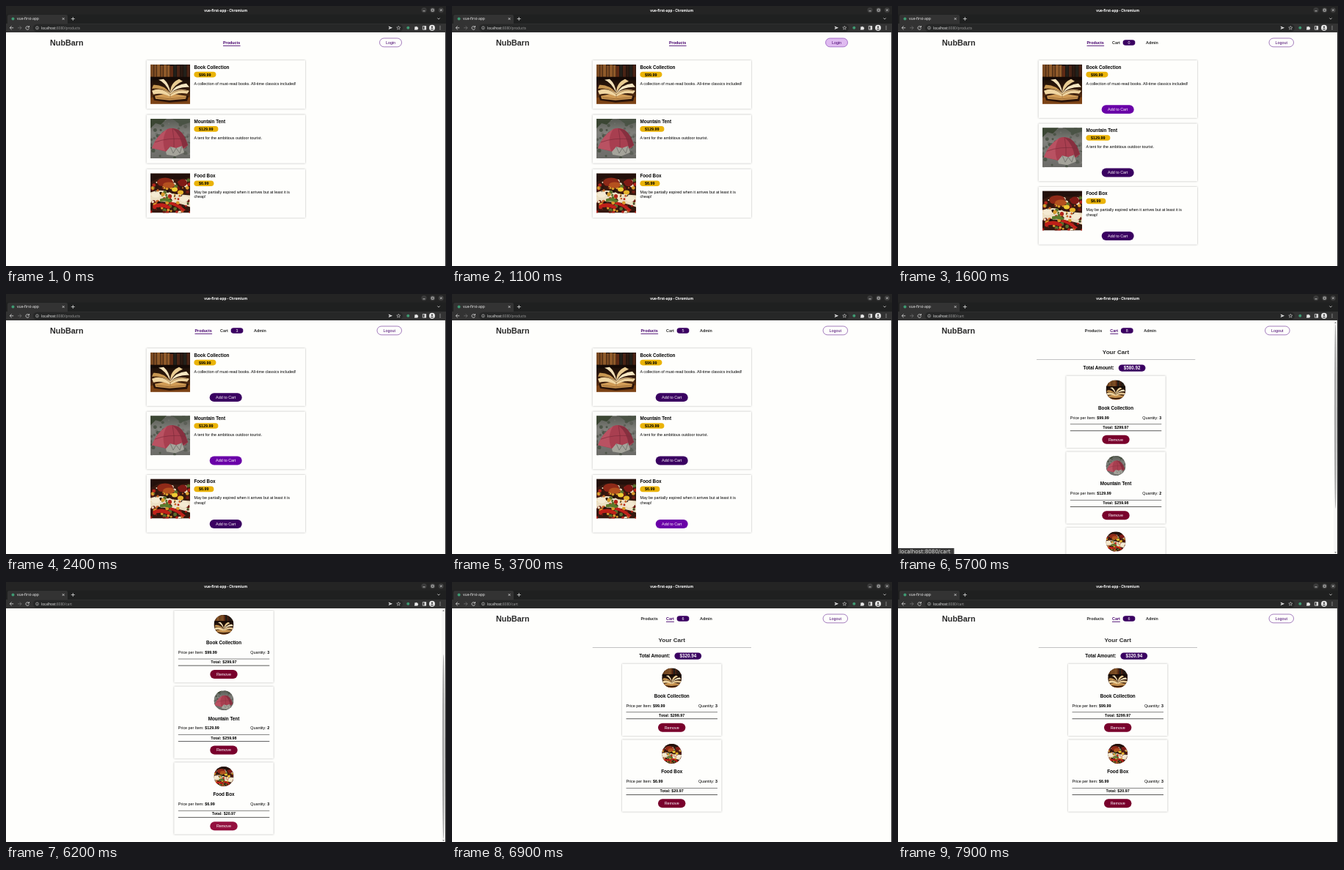
Recreate the animation shown at these times as an HTML page. Size 600x355 px, loop 8 s.

```html
<!DOCTYPE html>
<html lang="en">
<head>
<meta charset="utf-8">
<title>vue-first-app</title>
<style>
html, body { margin: 0; width: 100%; height: 100%; overflow: hidden; background: #fefefc; }
svg { display: block; width: 600px; height: 355px; }
text { font: 5.4px "Liberation Sans", Arial, sans-serif; fill: #000; white-space: pre; }
.b { font-weight: bold; }
.h3 { font-size: 6.32px; font-weight: bold; }
.h2 { font-size: 8.1px; font-weight: bold; fill: #292929; }
.h1 { font-size: 10.8px; font-weight: bold; fill: #292929; }
.mid { text-anchor: middle; }
.end { text-anchor: end; }
.nav { font-weight: bold; fill: #292929; }
.on { fill: #45006d; }
.light { fill: #fff; }
.ui text { font: 4.7px "Noto Sans", "Open Sans", sans-serif; fill: #e8e8e8; }
.ui .title { font-weight: bold; fill: #fff; }
.ui .tab { font-size: 5px; }
.ui .dim { fill: #9a9a9a; }
.card { fill: #fefefc; filter: drop-shadow(0 .7px 1.1px rgba(0, 0, 0, .3)); }
.status { font: 7.2px "DejaVu Sans", sans-serif; fill: #e2e2e2; }
</style>
</head>
<body>
<svg viewBox="0 0 600 355">
  <defs>
    <clipPath id="view"><rect y="36" width="600" height="319"/></clipPath>
    <clipPath id="square"><rect width="54" height="54"/></clipPath>
    <clipPath id="round"><circle cx="27" cy="27" r="27"/></clipPath>
    <linearGradient id="desk" x2="0" y2="1">
      <stop offset=".3" stop-color="#140b07"/><stop offset=".7" stop-color="#3c1f0d"/><stop offset="1" stop-color="#8a4b18"/>
    </linearGradient>
    <linearGradient id="rock" x2="0" y2="1">
      <stop stop-color="#565a52"/><stop offset=".35" stop-color="#80807b"/><stop offset="1" stop-color="#6b6b67"/>
    </linearGradient>
    <g id="books">
      <rect width="54" height="54" fill="url(#desk)"/>
      <g id="shelf"></g>
      <path d="M0 17H54V21H0Z" fill="#150a06"/>
      <path d="M0 46L14 42 54 45V54H0Z" fill="#7c4316"/>
      <path d="M3 43L25 37 52 43 50 50 26 52 5 49Z" fill="#2b1409"/>
      <path d="M6 43L25 39 49 43 48 47 26 49 7 47Z" fill="#cf9a55"/>
      <path d="M2 36Q14 30 27 39 39 31 53 36L50 40Q38 37 27 44 15 38 4 41Z" fill="#f0d6a2"/>
      <path d="M27 39Q17 27 4 28L2 33Q17 31 27 39Z" fill="#c99852"/>
      <path d="M27 39Q21 25 11 21L18 20Q26 27 27 39Z" fill="#f4e2ba"/>
      <path d="M27 39Q27 25 39 20L44 23Q33 27 27 39Z" fill="#e8cb92"/>
      <path d="M27 39Q35 27 49 26L53 31Q38 30 27 39Z" fill="#f6e6c2"/>
      <path d="M5 34Q17 32 27 41 38 33 50 36M27 41V45M8 45L26 47 48 45" fill="none" stroke="#7a4a1c" stroke-width=".6"/>
    </g>
    <g id="tent">
      <rect width="54" height="54" fill="url(#rock)"/>
      <g id="scree"></g>
      <path d="M0 0H22L14 8 7 6 0 13Z" fill="#3b4633"/>
      <path d="M30 0H54V5L42 9Z" fill="#4a5345"/>
      <path d="M2 40Q8 23 23 14 30 11 38 15 48 24 51 36L47 40 22 45Z" fill="#a83f50"/>
      <path d="M23 14Q14 27 20 44L2 40Q8 23 23 14Z" fill="#b95262"/>
      <path d="M30 13Q42 23 44 40L51 36Q47 21 38 15Z" fill="#86303f"/>
      <path d="M6 32Q24 25 48 28M30 13Q33 26 32 43" fill="none" stroke="#7d2c3b" stroke-width=".7"/>
      <path d="M21 45L27 38 35 40 43 37 46 46 34 51 22 49Z" fill="#a5a49b"/>
      <path d="M27 38L31 47 35 40 40 47 43 37" fill="none" stroke="#6d6d67" stroke-width=".8"/>
    </g>
    <g id="food">
      <rect width="54" height="54" fill="#35180f"/>
      <path d="M0 26Q16 20 30 28L54 30V46Q30 36 0 40Z" fill="#ecdfc3"/>
      <g id="mix"></g>
      <path d="M0 0H54V5L40 8 12 6 0 12Z" fill="#23100b"/>
      <ellipse cx="20" cy="12" rx="11" ry="6" fill="#8f2a18"/>
      <ellipse cx="25" cy="16" rx="8" ry="4" fill="#b4511f"/>
      <ellipse cx="44" cy="13" rx="6" ry="5" fill="#7e1a15"/>
      <ellipse cx="7" cy="29" rx="6" ry="4" fill="#f4ead2"/>
      <ellipse cx="33" cy="22" rx="4" ry="3" fill="#efcb33"/>
      <ellipse cx="41" cy="26" rx="4" ry="3" fill="#e7b42c"/>
      <ellipse cx="46" cy="35" rx="6" ry="4" fill="#f4ead2"/>
      <path d="M3 44Q15 37 28 46L25 49Q14 44 4 48ZM26 38Q38 41 48 50L44 52Q35 44 25 42Z" fill="#bf2019"/>
      <path d="M13 35Q22 32 30 37L27 40Q21 37 13 39Z" fill="#5a7a2c"/>
    </g>
  </defs>
  <g id="page" clip-path="url(#view)"></g>
  <g class="ui">
    <rect width="600" height="12" fill="#242424"/>
    <rect y="11.5" width="600" height="12.5" fill="#1f2020"/>
    <path d="M2 24V14Q2 12 4 12H82Q84 12 84 14V24H600V36H0V24Z" fill="#333"/>
    <rect x="599" y="36" width="1" height="319" fill="#2a2a2a"/>
    <rect x="37" y="24.7" width="504" height="10.6" rx="5.3" fill="#262727"/>
    <text class="title mid" x="299.7" y="7.7">vue-first-app - Chromium</text>
    <text class="tab" x="15" y="19.1">vue-first-app</text>
    <text x="48" y="31.7">localhost<tspan class="dim">:8080</tspan><tspan class="dim" id="path"></tspan></text>
    <g fill="#3f9a72"><circle cx="9.5" cy="17.4" r="2"/><circle cx="548.3" cy="29.8" r="2"/></g>
    <g fill="#3b3b3b"><circle cx="570" cy="5.6" r="3.7"/><circle cx="581.7" cy="5.6" r="3.7"/><circle cx="593.3" cy="5.6" r="3.7"/></g>
    <g fill="none" stroke="#e4e4e4" stroke-width=".75">
      <path d="M568.5 6.8H571.5M580.2 4.2H583.2V7.1H580.2ZM592 4.3L594.6 6.9M594.6 4.3L592 6.9"/>
      <path d="M76.8 16.1L79.6 18.9M79.6 16.1L76.8 18.9M88.8 17.5H93.8M91.3 15V20M588.3 16.4L590 18.1 591.7 16.4"/>
      <path d="M10.2 29.8H5.3M7.6 27.4L5.2 29.8 7.6 32.2M31.2 28.7A2.3 2.3 0 1 0 31.5 30.5M31.5 27V29H29.4"/>
      <path d="M16.2 29.8H21M18.7 27.4L21.1 29.8 18.7 32.2" stroke="#777"/>
      <g stroke-width=".5"><circle cx="42.5" cy="29.9" r="2"/><path d="M42.5 29.6V31M42.5 28.6V29.1"/>
      <path d="M535.3 27.3L536 29 537.9 29.1 536.4 30.3 536.9 32.1 535.3 31.1 533.7 32.1 534.2 30.3 532.7 29.1 534.6 29Z"/></g>
      <path d="M568.3 27.5H572.7V32.2H568.3Z"/>
    </g>
    <g fill="#e8e8e8">
      <path d="M521.6 27.6L527 29.8 521.6 32 522.3 30.2 524.6 29.8 522.3 29.4Z"/>
      <path d="M557 28.4H558.4A1 1 0 0 1 560.3 28.4H561.5V29.5A1 1 0 0 1 561.5 31.4V32.4H557V31A1 1 0 0 0 557 29.3Z"/>
      <path d="M570.5 27.5H572.7V32.2H570.5Z"/>
      <circle cx="581" cy="29.8" r="4"/>
      <circle cx="592" cy="27.8" r=".55"/><circle cx="592" cy="29.8" r=".55"/><circle cx="592" cy="31.8" r=".55"/>
    </g>
    <g fill="#444"><circle cx="581" cy="28.7" r="1.2"/><path d="M578.7 32.2Q581 29.5 583.3 32.2Z"/></g>
  </g>
</svg>
<script>
const $ = id => document.getElementById(id);
const LOOP = 8000, STEP = 100, MAX_SCROLL = 72.7;
const PURPLE = '#3a0061', BRIGHT = '#6a00a8', MAROON = '#79002c';
const items = [
  { img: 'books', name: 'Book Collection', price: 99.99, pill: 30, adds: [1700, 2000, 2200], hover: [1600, 2400],
    text: ['A collection of must-read books. All-time classics included!'] },
  { img: 'tent', name: 'Mountain Tent', price: 129.99, pill: 33, adds: [2600, 2900], hover: [2400, 3100],
    text: ['A tent for the ambitious outdoor tourist.'] },
  { img: 'food', name: 'Food Box', price: 6.99, pill: 27, adds: [3900, 4100, 4300], hover: [3200, 4600],
    text: ['May be partially expired when it arrives but at least it is', 'cheap!'] }
];
const LOGIN = 1200, CART = 5100, REMOVE = 6900;

const within = (t, [a, b]) => t >= a && t < b;
const money = n => '$' + n.toFixed(2);
const text = (x, y, s, cls = '') => `<text x="${x}" y="${y}" class="${cls}">${s}</text>`;
const rect = (x, y, w, h, fill, extra = '') => `<rect x="${x}" y="${y}" width="${w}" height="${h}" fill="${fill}" ${extra}/>`;
const pill = (x, y, w, h, fill, extra = '') => rect(x, y, w, h, fill, `rx="${h / 2}" ${extra}`);
const group = (dx, dy, s) => `<g transform="translate(${dx} ${dy})">${s}</g>`;
const photo = (img, x, y, scale, clip) =>
  `<g transform="translate(${x} ${y}) scale(${scale})" clip-path="url(#${clip})"><use href="#${img}"/></g>`;
const count = (item, t) => item.adds.filter(a => t >= a).length;

// Photo details
function seeded(n) {
  return () => (n = (n * 16807) % 2147483647) / 2147483647;
}
function fillPhotos() {
  const rnd = seeded(77), pick = list => list[Math.floor(rnd() * list.length)];
  const dots = (n, top, size, colors) => Array.from({ length: n }, () =>
    `<circle cx="${rnd() * 54}" cy="${top + rnd() * (54 - top)}" r="${size * (.4 + rnd() * .6)}" fill="${pick(colors)}"/>`).join('');
  let shelf = '';
  for (let x = 0; x < 54; x += 4.5)
    shelf += rect(x, rnd() * 2, 4, 17, pick(x < 30 ? ['#7a4a22', '#5e2a14', '#8f5a2a'] : ['#2c1a12', '#4a2415', '#22201a']));
  $('shelf').innerHTML = shelf;
  $('scree').innerHTML = dots(70, 0, 2.6, ['#5c5f57', '#8d8d88', '#70716b', '#4d5548']);
  $('mix').innerHTML = dots(110, 9, 2.6, ['#b3241b', '#d99a2c', '#5a6f2c', '#efe3c6', '#6d1a13', '#c8642a', '#22110b']);
}

function header(t, bar) {
  const logged = t >= LOGIN, cartOn = t >= 4900;
  const link = (x, w, s, on) => text(x, 51.7, s, on ? 'nav on' : 'nav') + (on ? rect(x, 53.8, w, .9, '#45006d') : '');
  const total = items.reduce((n, it) => n + count(it, t), 0) - (t >= REMOVE ? 2 : 0);
  let nav;
  if (!logged) nav = link(296, 23.6, 'Products', true);
  else nav = link(257.5, 23.6, 'Products', t < CART) + link(292, 10.9, 'Cart', cartOn)
    + pill(306.6, 46.3, 16.8, 7.5, PURPLE) + text(315, 52, total, 'light mid') + link(338, 17, 'Admin');
  const over = within(t, [700, LOGIN]), x = logged ? 506 : 509.5;
  const button = pill(x, 44, 539.5 - x, 11.8, over ? '#dfbaf0' : '#fefefc', `stroke="${over ? '#8a48b8' : '#7d45a3'}" stroke-width=".7"`)
    + text((x + 539.5) / 2, 51.8, logged ? 'Logout' : 'Login', 'on mid');
  return group(bar && -.6, 0, text(60, 53.8, 'NubBarn', 'h1')) + group(bar && -2.7, 0, nav) + group(bar && -5.4, 0, button);
}

function product(item, i, t) {
  const logged = t >= LOGIN;
  let s = rect(191.7, 74.2, 216.3, logged ? 78.7 : 66.2, '', 'class="card"')
    + photo(item.img, 197, 79.8, 1, 'square')
    + text(256.4, 85.5, item.name, 'h3')
    + pill(256.4, 89.8, item.pill, 7.6, '#eab308')
    + text(263.1, 95.5, money(item.price), 'b');
  item.text.forEach((row, n) => s += text(256.4, 107.7 + n * 6.2, row));
  if (logged) s += pill(277.7, 135.2, 44, 11.9, within(t, item.hover) ? BRIGHT : PURPLE)
    + text(299.7, 143, 'Add to Cart', 'light mid');
  return group(0, i * (logged ? 86.4 : 74.3), s);
}

function cartItem(item, i, over) {
  const n = item.adds.length;
  return group(0, i * 103.6, rect(232, 111.8, 135.4, 98.2, '', 'class="card"')
    + photo(item.img, 286.2, 117.4, .5, 'round')
    + text(299.7, 157.9, item.name, 'h3 mid')
    + text(237.5, 170.6, `Price per Item: <tspan class="b">${money(item.price)}</tspan>`)
    + text(362, 170.6, `Quantity: <tspan class="b">${n}</tspan>`, 'end')
    + rect(237.5, 177.4, 124.5, .7, '#555') + rect(237.5, 186.4, 124.5, .8, '#333')
    + text(299.7, 183.8, 'Total: ' + money(item.price * n), 'b mid')
    + pill(281, 192.7, 37.4, 12, over ? '#94103f' : MAROON)
    + text(299.7, 200.6, 'Remove', 'light mid'));
}

function cart(t) {
  const list = t >= REMOVE ? items.filter(it => it.img !== 'tent') : items;
  const total = list.reduce((n, it) => n + it.price * it.adds.length, 0);
  const over = { food: within(t, [6200, 6500]), tent: within(t, [6700, REMOVE]) };
  return text(299.7, 81.7, 'Your Cart', 'h2 mid') + rect(191.7, 89.2, 216.3, .7, '#aaa')
    + text(255.3, 103, 'Total Amount:', 'h3')
    + pill(303.4, 96.5, 36.8, 9.2, PURPLE) + text(321.8, 103.2, money(total), 'h3 light mid')
    + list.map((it, i) => cartItem(it, i, over[it.img])).join('');
}

function scrollbar(k) {
  return rect(594, 36, 5, 319, '#f7f7f6') + pill(594.9, 41 + 58 * k, 3.4, 252, '#adadad')
    + '<path d="M595.2 39.8L596.6 38.2 598 39.8ZM595.2 352.2L596.6 353.8 598 352.2Z" fill="#666"/>';
}

function draw(t) {
  const onCart = t >= CART, bar = onCart && t < REMOVE;
  const p = Math.min(1, Math.max(0, (t - 5700) / 500)), k = bar ? p * p * (3 - 2 * p) : 0;
  const body = onCart ? group(bar ? -2.7 : 0, 0, cart(t)) : items.map((it, i) => product(it, i, t)).join('');
  let s = rect(0, 36, 600, 319, '#fefefc') + group(0, -MAX_SCROLL * k, header(t, bar) + body);
  if (bar) s += scrollbar(k);
  if (within(t, [4900, 5800])) s += rect(0, 347, 76.5, 8, '#3b3b3b') + text(2, 353.6, 'localhost:8080/cart', 'status');
  $('page').innerHTML = s;
  $('path').textContent = onCart ? '/cart' : '/products';
}

fillPhotos();
const start = performance.now();
let last = -1;
function tick() {
  const t = Math.floor(((performance.now() - start) % LOOP) / STEP) * STEP;
  if (t !== last) draw(last = t);
  requestAnimationFrame(tick);
}
tick();
</script>
</body>
</html>
```
